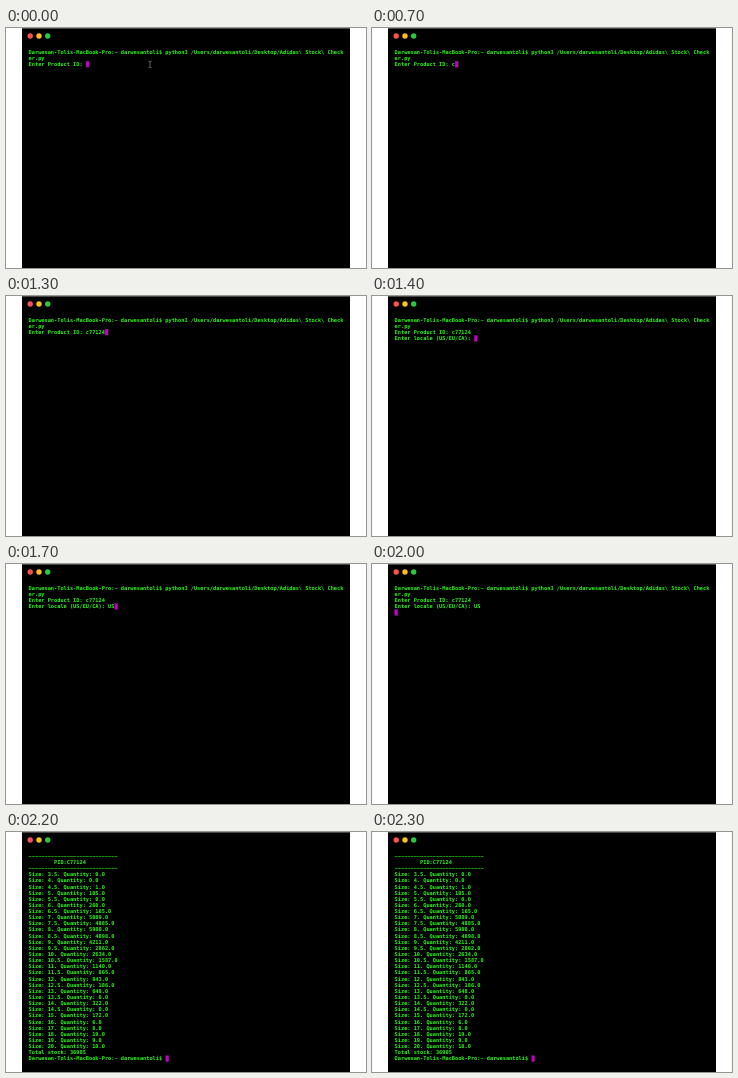
Write an HTML page that moves like this. It is 360 px wide and 240 px high and loops after 2400 ms.

```html
<!DOCTYPE html>
<html lang="en">
<head>
<meta charset="utf-8">
<title>Stock checker terminal</title>
<style>
  html, body { margin: 0; width: 100%; height: 100%; overflow: hidden; background: #fff; }
  svg { display: block; width: 100vw; height: 100vh; }
  text {
    font: bold 5.29px "DejaVu Sans Mono", monospace;
    fill: #28fe14;
    white-space: pre;
    text-rendering: geometricPrecision;
  }
</style>
</head>
<body>
<svg viewBox="0 0 360 240">
  <rect x="16" width="328" height="240"/>
  <rect x="16" width="328" height="1" fill="#484848"/>
  <circle cx="24.2" cy="8" r="2.7" fill="#ff5148"/>
  <circle cx="33" cy="8" r="2.7" fill="#ffbd2e"/>
  <circle cx="41.7" cy="8" r="2.7" fill="#28c840"/>
  <rect id="cursor" width="3.2" height="6.14" fill="#c200c2"/>
  <g id="lines"></g>
  <path id="pointer" d="M142.3 33.2q1.7 0 1.7 1.2q0-1.2 1.7-1.2M144 34.4V38.6M142.3 39.8q1.7 0 1.7-1.2q0 1.2 1.7 1.2" fill="none" stroke="#777" stroke-width=".8"/>
</svg>
<script>
const LOOP = 2400, LEFT = 22.6, TOP = 20.9, ROW = 6.14, COL = 3.185, ASCENT = 4.9;
const $ = id => document.getElementById(id);

const prompt = 'Darwesan-Tolis-MacBook-Pro:~ darwesantoli$ ';
const command = prompt + 'python3 /Users/darwesantoli/Desktop/Adidas\\ Stock\\ Check\ner.py\n';
const askId = command + 'Enter Product ID: ';
const askLocale = askId + 'c77124\nEnter locale (US/EU/CA): ';

const stock = [0, 0, 1, 105, 0, 260, 165, 5089, 4885, 5980, 4898, 4211, 2862, 2634, 1587,
  1140, 865, 843, 186, 648, 0, 322, 0, 172, 6, 8, 19, 9, 10];
const sizeAt = i => i < 24 ? 3.5 + i / 2 : i - 8;
const rule = '~'.repeat(28);
const report = [
  rule, ' '.repeat(8) + 'PID:C77124', rule,
  ...stock.map((n, i) => `Size: ${sizeAt(i)}. Quantity: ${n.toFixed(1)}`),
  'Total stock: ' + stock.reduce((a, b) => a + b), ''
].join('\n');

// Each entry: start time in ms, screen contents (the cursor follows the last character)
const screens = [
  [0, askId],
  ...[700, 800, 900, 1000, 1200, 1300].map((t, i) => [t, askId + 'c77124'.slice(0, i + 1)]),
  [1400, askLocale],
  [1700, askLocale + 'US'],
  [1800, askLocale + 'US\n'],
  [2100, report],
  [2200, report + prompt]
];

let shown;
function show(content) {
  if (content === shown) return;
  shown = content;
  const rows = content.split('\n'), last = rows.length - 1;
  $('lines').replaceChildren(...rows.map((row, i) => {
    const line = document.createElementNS('http://www.w3.org/2000/svg', 'text');
    line.setAttribute('x', LEFT);
    line.setAttribute('y', TOP + ASCENT + i * ROW);
    line.textContent = row;
    return line;
  }));
  $('cursor').setAttribute('x', LEFT + rows[last].length * COL);
  $('cursor').setAttribute('y', TOP + last * ROW);
}

const start = performance.now();
function draw() {
  const t = (performance.now() - start) % LOOP;
  show(screens.findLast(([from]) => from <= t)[1]);
  $('pointer').style.visibility = t < 700 ? 'visible' : 'hidden';
  requestAnimationFrame(draw);
}
draw();
</script>
</body>
</html>
```
